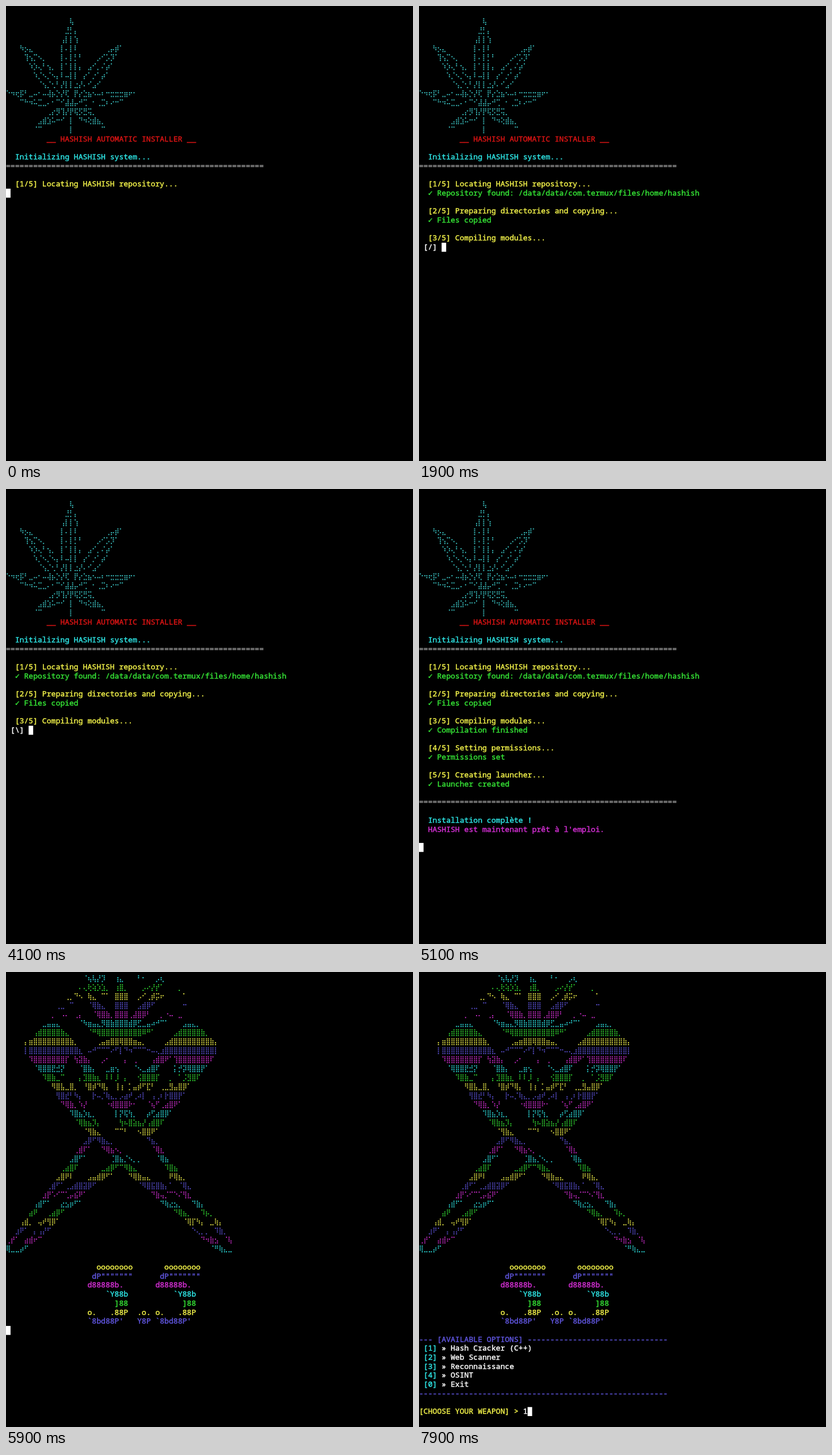
An HTML page that plays this animation: 707x792 px, repeating every 8000 ms.

```html
<!DOCTYPE html>
<html lang="en">
<head>
<meta charset="utf-8">
<title>Terminal installer</title>
<style>
  html, body { margin: 0; width: 100%; height: 100%; overflow: hidden; background: #000; }
  svg { display: block; width: 707px; height: 792px; }
  text { font: 500 13.1px "Noto Sans Mono", "DejaVu Sans Mono", monospace; white-space: pre; stroke-width: 0.45px; }
</style>
</head>
<body>
<svg id="stage" viewBox="0 0 707 792"></svg>
<script>
const LOOP = 8000, CELL = 7.86, LINE = 15.69, MIDDLE = 12;
const AT = { found: 100, compile: 300, done: 4800, banner: 5600, menu: 6000, key: 7600 };
const RED = '#d91414', CYAN = '#2ee5e5', YELLOW = '#f3f34a', GREEN = '#35e335',
      BLUE = '#5f55dd', MAGENTA = '#d52fd5', GRAY = '#8c8c8c', WHITE = '#fff';
const RAINBOW = [CYAN, GREEN, YELLOW, BLUE, MAGENTA];
const stage = document.getElementById('stage');

function add(parent, tag, attrs) {
  const node = document.createElementNS('http://www.w3.org/2000/svg', tag);
  for (const key in attrs) node.setAttribute(key, attrs[key]);
  return parent.appendChild(node);
}

const layers = [];
function layer(from, to) {
  const node = add(stage, 'g', {});
  layers.push({ node, from, to });
  return node;
}

// A thin stroke in the fill colour gives the medium terminal weight.
function put(parent, col, row, content, color) {
  const node = add(parent, 'text', {
    x: col * CELL, y: MIDDLE + row * LINE + 4, fill: color, stroke: color
  });
  node.textContent = content;
  return node;
}

// Draws braille cells as square dots, one path per line.
function braille(parent, firstRow, art, color) {
  art.split('\n').slice(1, -1).forEach((line, i) => {
    const row = firstRow + i, top = MIDDLE + (row - 0.5) * LINE;
    let d = '';
    [...line].forEach((char, col) => {
      const bits = char.charCodeAt(0) - 0x2800;
      for (let bit = 0; bits > 0 && bit < 8; bit++) {
        if (!(bits >> bit & 1)) continue;
        const dx = bit < 6 ? Math.floor(bit / 3) : bit - 6;
        const dy = bit < 6 ? bit % 3 : 3;
        const x = col * CELL + 1.3 + dx * 3.4, y = top + 1.5 + dy * 3.25;
        d += `M${x.toFixed(2)} ${y.toFixed(2)}h2v2h-2z`;
      }
    });
    add(parent, 'path', { d, fill: color(row), opacity: 0.88 });
  });
}

const LEAF = `
              ⢧
             ⣘⡃⡄
            ⢠⡇⡇⢱
   ⠳⡢⣄      ⡇⠄⡇⠇      ⢀⡤⡾⠁
    ⢹⢢⡉⠢⡀   ⡇⠄⡇⡃⠃   ⡠⠊⡡⡹⠁
     ⠱⡱⢄⠃⢢⡀ ⡇⠁⡇⡇⡄ ⣠⠊⡀⠌⡴⠁
      ⠱⡈⠢⡈⠢⡄⠇⠤⡇⡇ ⡔⠁⡐⠁⡴⠁
       ⠈⢢⡈⢂⠃⡜⡇⡇⣐⡜⠄⠊⣠⠊
⠑⠲⢖⡯⠃⣀⠤⠂⠤⢼⡦⡑⡜⢏ ⡟⡔⣑⣦⠢⠤⠆⠒⣒⣒⣒⣶⠖⠂
   ⠉⠓⠲⠥⣉⣀⠄⠂⠉⠊⣼⣼⡤⠚⢉ ⠂⢀⣉⠆⠔⠒⠉
         ⢀⡔⡻⢹⡜⡟⢯⡫⣛⢭⡀
       ⣠⣾⣱⠥⠒⠊ ⡇ ⠙⠲⢕⣾⣦⡀
      ⠈⠉      ⡇      ⠉
`;

const SKULL = `
                 ⠈⢦⢧⡜⡹  ⢰⣄   ⠃⠂  ⡠⢆
                ⠄⢄⢗⢵⡱⣱⡀ ⢰⣿⡀   ⡠⠔⡜⡞⠁   ⡀
             ⢀⡀⠙⠢ ⢷⣄ ⠉⠁ ⣿⣿⣿  ⡠⠊⢀⡾⡭⠖    ⠁
           ⢀⣀ ⠉   ⠈⢿⣷⣄  ⣿⣿⣿  ⣠⣾⡿⠋      ⠒
          ⡀ ⠠⠄ ⢀⡄  ⠈⢿⣿⣷⡀⣿⣿⣿⢀⣼⣿⡿⠃  ⡀⠐⠤ ⣀
        ⣀⣤⣤⣄    ⠈⠳⣶⣤⣄⡻⣿⣷⣿⣿⣿⣾⡿⣋⣀⣤⠴⠚⠉⠁   ⣠⣤⣄⡀
      ⢠⣾⣿⣿⣿⣿⣷⣄    ⠈⠛⢿⣿⣿⣿⣿⣿⣿⣿⣿⣿⠿⠛⠁    ⣠⣾⣿⣿⣿⣿⣷⡀
    ⡄⣶⣿⣿⣿⣿⣿⣿⣿⣿⣷⡀    ⢀⣤⣶⣿⣿⢿⣿⣿⣶⣤⡀    ⣠⣾⣿⣿⣿⣿⣿⣿⣿⣿⣷⡄
    ⡇⣿⣿⣿⣿⣿⣿⣿⣿⣿⣿⣿⣆ ⠤⠚⠉⠉⠉⠔⠋⡇⠙⠲⠉⠉⠉⠒⠤⢄⣰⣿⣿⣿⣿⣿⣿⣿⣿⣿⣿⣿⡇
     ⠹⣿⣿⣿⣿⣿⣿⣿⡏ ⢳⣽⣷⡄  ⡠⠂   ⡄ ⢀   ⢠⣾⣿⠟⠁⢹⣿⣿⣿⣿⣿⣿⣿⠏
      ⠈⢿⣿⣿⣟⣚⡝   ⠈⣿⣷⡄  ⣀⣶⢢   ⠈⠢⣀⣴⣿⠏   ⡅⡚⡽⢿⣿⣿⡟⠁
        ⠹⣿⣷⣀⠉   ⡄⣹⣿⣷⣆ ⠇⠇⡸ ⡄  ⢪⣿⣿⣿⡏  ⡀ ⠁⡨⣻⣿⠏
          ⠻⣿⣧⣀⣿⡀ ⠘⣿⡾⠙⢿⡄ ⢸⢰ ⡁⣤⡾⠋⣏⠃ ⢀⣀⣻⣤⣿⡿⠁
           ⢻⣿⣞⠃⠳⡄  ⡗⠤⡈⢷⣄⡀⡠⣴⠞⢀⠴⡇ ⢠⢀⠆⡗⣿⣿⡟⠁
            ⠙⢿⣷⡀⠱⡜    ⠐⢾⣿⣿⣿⠗⠂  ⠈⢦⠋⢀⣴⣿⠟⠁
              ⠹⣿⣦⡱⣆⡀    ⡇⡝⢯⢳⡀  ⡴⢋⣴⣿⡿⠁
               ⠈⢿⣷⣦⡹⡄    ⢳⠦⣿⣵⣦⡜⢠⣾⣿⠏
                 ⠈⢻⣷⣄   ⠉⠉⠃  ⠢⣿⣿⠟⠁
                 ⣠⡿⠋⠻⣷⣄⡀       ⠙⣦⡀
               ⢀⣾⠏⠁  ⠙⢿⣦⠢⡀      ⠈⢿⣆
              ⣠⣿⠋⠁     ⢈⣿⣦⡈⠢⡀⡀   ⠈⢿⣦
            ⢀⣴⣿⠏     ⣀⣴⡿⠋⠉⠻⣷⣄      ⠹⣿⣦
           ⣠⣿⠟⠇   ⣠⣤⣾⡿⠋⠁   ⠙⢿⣷⣤⣄    ⠟⢿⣦⡀
         ⢀⣾⠋⠁⢀⣠⣾⣿⣽⡿⠋         ⠈⠻⣿⣯⣿⣷⡄⠁ ⠈⢿⣄
        ⣰⡟⠡⠊⠉⢁⡤⣮⠟⠁              ⠙⣷⢤⡈⠉⠑⠌⢻⣆
      ⢠⣾⠋⠁  ⣔⣢⡶⠋⠁                 ⠙⢷⣔⣢⡀  ⠙⣷⡄
     ⣴⠟  ⢀⣴⡿⠋                        ⠙⢿⣦⡀  ⠹⡦⡀
   ⢠⣾⡀ ⢤⠞⢻⡿⠁                           ⠈⢿⡏⠳⡄ ⣀⢷⡄
  ⣰⠟⠁ ⡄⢠⡜⠋                               ⠑⢄⡀⡀ ⠹⣷⡀
⢀⡞⠁ ⣴⣾⠖⠉                                   ⠙⠲⣷⣢ ⠈⢧
⢿⣀⣀⡴⠋                                        ⠈⠛⢷⣄⣀
`;

// Installer log
const intro = layer(0, AT.banner);
braille(intro, 1, LEAF, () => '#3fd0d0');
put(intro, 9, 14, '__ HASHISH AUTOMATIC INSTALLER __', RED);
put(intro, 2, 16, 'Initializing HASHISH system...', CYAN);
put(intro, 0, 17, '='.repeat(57), GRAY);

const found = layer(AT.found, AT.banner);
const compile = layer(AT.compile, AT.banner);
const done = layer(AT.done, AT.banner);
const steps = [
  ['Locating HASHISH repository', intro, 'Repository found: /data/data/com.termux/files/home/hashish', found],
  ['Preparing directories and copying', found, 'Files copied', compile],
  ['Compiling modules', compile, 'Compilation finished', done],
  ['Setting permissions', done, 'Permissions set', done],
  ['Creating launcher', done, 'Launcher created', done]
];
steps.forEach(([task, taskLayer, result, resultLayer], i) => {
  const row = 19 + 3 * i;
  put(taskLayer, 2, row, `[${i + 1}/5] ${task}...`, YELLOW);
  put(resultLayer, 2, row + 1, '✓', GREEN);
  put(resultLayer, 4, row + 1, result, GREEN);
});
put(done, 0, 34, '='.repeat(57), GRAY);
put(done, 2, 36, 'Installation complète !', CYAN);
put(done, 2, 37, "HASHISH est maintenant prêt à l'emploi.", MAGENTA);
const spinner = put(layer(AT.compile, AT.done), 1, 26, '[/]', WHITE);

// Banner
const banner = layer(AT.banner, LOOP);
braille(banner, 0, SKULL, row => RAINBOW[row % 5]);
const digit = [
  '  oooooooo', ' dP"""""""', 'd88888b.', '    `Y88b',
  '      ]88', 'o.   .88P', "`8bd88P'"
];
digit.forEach((line, i) => {
  for (const col of [18, 33]) put(banner, col, 32 + i, line, RAINBOW[(32 + i) % 5]);
});
put(banner, 29, 37, '.o.', YELLOW);
put(banner, 29, 38, 'Y8P', BLUE);

// Menu
const menu = layer(AT.menu, LOOP);
put(menu, 0, 40, '--- [AVAILABLE OPTIONS] ' + '-'.repeat(31), BLUE);
['Hash Cracker (C++)', 'Web Scanner', 'Reconnaissance', 'OSINT', 'Exit'].forEach((name, i) => {
  put(menu, 1, 41 + i, `[${(i + 1) % 5}]`, CYAN);
  put(menu, 5, 41 + i, '» ' + name, WHITE);
});
put(menu, 0, 46, '-'.repeat(55), BLUE);
put(menu, 0, 48, '[CHOOSE YOUR WEAPON] >', YELLOW);
put(layer(AT.key, LOOP), 23, 48, '1', WHITE);

const cursor = add(stage, 'rect', { width: 7.9, height: LINE, fill: WHITE });
function cursorCell(t) {
  if (t < AT.found) return [0, 20];
  if (t < AT.compile) return [0, 23];
  if (t < AT.done) return [5, 26];
  if (t < AT.menu) return [0, 39];
  return [t < AT.key ? 23 : 24, 48];
}

function render(t) {
  for (const { node, from, to } of layers) {
    node.style.display = t >= from && t < to ? '' : 'none';
  }
  const turn = Math.floor((t - 1000) / 120 + 9.6);
  spinner.textContent = `[${'|/-\\'[turn % 4]}]`;
  const [col, row] = cursorCell(t);
  cursor.setAttribute('x', col * CELL);
  cursor.setAttribute('y', MIDDLE + (row - 0.5) * LINE);
}

const start = performance.now();
function tick() {
  render((performance.now() - start) % LOOP);
  requestAnimationFrame(tick);
}
tick();
</script>
</body>
</html>
```
